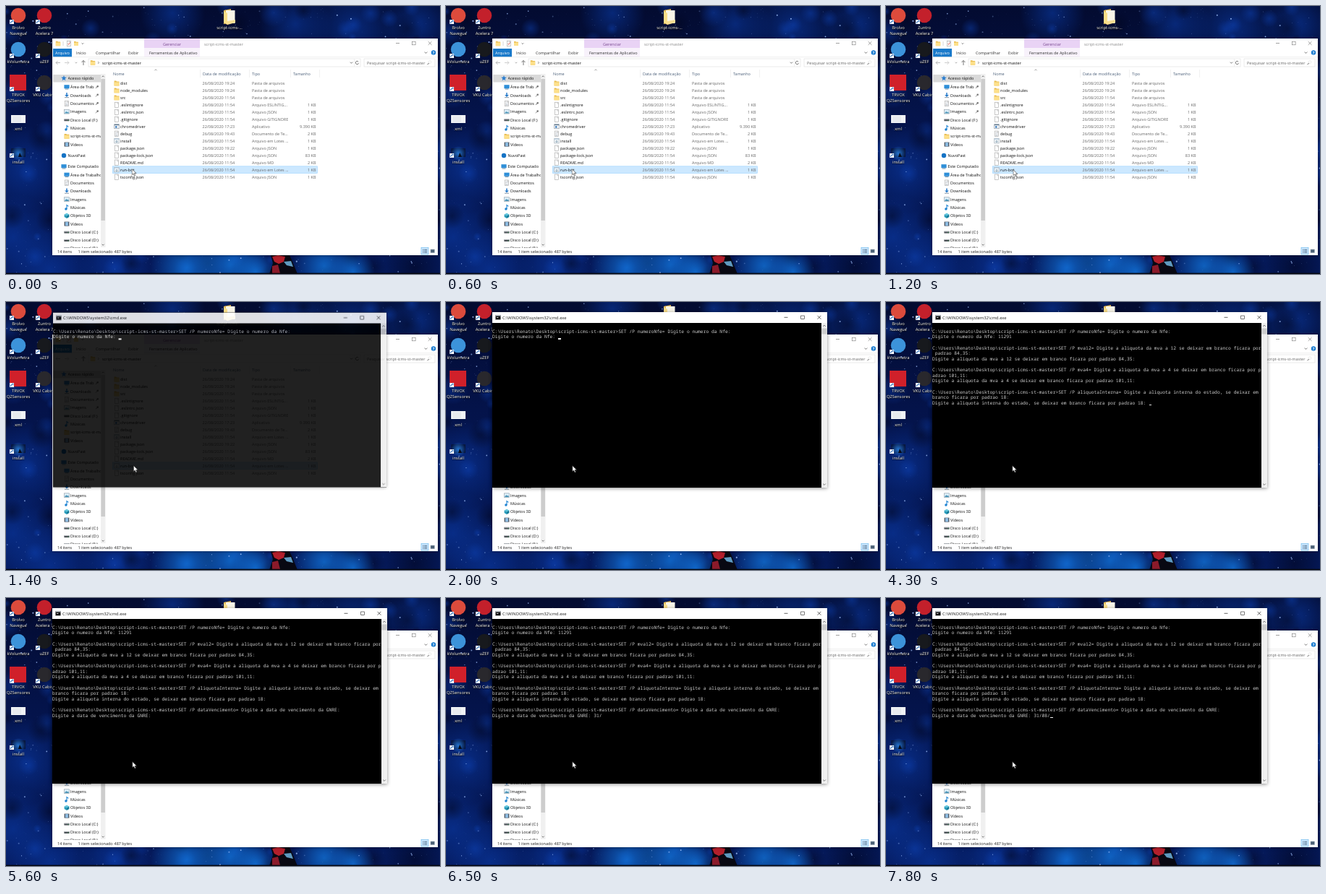
An HTML page with a canvas for the animation above (8 s loop, 600 by 371 pixels).

```html
<!DOCTYPE html>
<html lang="pt-BR">
<head>
<meta charset="utf-8">
<title>Terminal</title>
<style>
html, body { margin: 0; width: 100%; height: 100%; overflow: hidden; background: #020a26; }
#stage { position: absolute; left: 0; top: 0; width: 600px; height: 371px; overflow: hidden;
  font: 5.5px/8px "Open Sans", "Noto Sans", sans-serif; text-rendering: geometricPrecision; }
#stage div, canvas, #mouse { position: absolute; left: 0; top: 0; }
canvas { width: 600px; height: 371px; }
span { position: absolute; white-space: pre; }
.mid { transform: translateX(-50%); }
.end { transform: translateX(-100%); }
.desk { color: #fff; font-size: 5.8px; text-shadow: 0 .5px 1px #000, 0 0 1px #000; }
.dim { color: #666; }
.head { color: #4c607a; }
.side { color: #111; width: 42px; overflow: hidden; }
#cmd { width: 463px; height: 243px; transform: translate(64px, 14px); background: #000;
  box-shadow: 0 1px 5px rgba(0,0,0,.45); visibility: hidden; }
#cmd canvas { width: 463px; height: 243px; }
#out { margin: 0; position: absolute; left: 0; top: 22.6px; color: #ccc;
  font: 6.32px/7.64px "Noto Sans Mono", "DejaVu Sans Mono", monospace; }
#caret { width: 3.8px; height: 1.3px; background: #eee; }
</style>
</head>
<body>
<div id="stage">
  <div id="desk"></div>
  <div id="win"></div>
  <div id="cmd"><pre id="out"></pre><div id="caret"></div></div>
  <svg id="mouse" width="9" height="12" viewBox="0 0 9 12">
    <path d="M.6 .6V8.6L2.5 7 3.8 10 5.2 9.4 4 6.5H6.5Z" fill="#fff" stroke="#222" stroke-width=".6"/>
  </svg>
</div>
<script>
const $ = id => document.getElementById(id);
const COLS = 120, CELL = 3.792, ROW = 7.64, LOOP = 8000;
let g;

function layer(parent, w, h) {
  const c = document.createElement('canvas'), k = Math.max(1, window.devicePixelRatio || 1);
  c.width = w * k; c.height = h * k;
  parent.prepend(c);
  g = c.getContext('2d');
  g.scale(k, k);
}
function rect(x, y, w, h, fill, line) {
  if (fill) { g.fillStyle = fill; g.fillRect(x, y, w, h); }
  if (line) { g.strokeStyle = line; g.lineWidth = .6; g.strokeRect(x, y, w, h); }
}
function disc(x, y, r, fill) {
  g.fillStyle = fill; g.beginPath(); g.arc(x, y, r, 0, 7); g.fill();
}
function path(color, width, ...p) {
  g.strokeStyle = color; g.lineWidth = width; g.beginPath();
  for (let i = 0; i < p.length; i += 2) g.lineTo(p[i], p[i + 1]);
  g.stroke();
}
function shape(color, ...p) {
  g.fillStyle = color; g.beginPath();
  for (let i = 0; i < p.length; i += 2) g.lineTo(p[i], p[i + 1]);
  g.fill();
}
function chevron(x, y, s, dir, color = '#555') {
  path(color, .8, x - s, y - s / 2 * dir, x, y + s / 2 * dir, x + s, y - s / 2 * dir);
}
function controls(x, y, gap, color) {
  path(color, .7, x - 2.5, y, x + 2.5, y);
  rect(x + gap - 2.3, y - 2.3, 4.6, 4.6, null, color);
  const c = x + 2 * gap;
  path(color, .7, c - 2.4, y - 2.4, c + 2.4, y + 2.4);
  path(color, .7, c + 2.4, y - 2.4, c - 2.4, y + 2.4);
}
// y is the vertical centre of the line
function label(parent, x, y, text, cls = '', style = '') {
  const s = document.createElement('span');
  s.className = cls; s.textContent = text;
  s.style.cssText = `left:${x}px;top:${y - 4}px;${style}`;
  parent.append(s);
}
let seed = 11;
const rnd = () => (seed = (seed * 16807) % 2147483647) / 2147483647;

function glow(x, y, r, rgb, a) {
  const f = g.createRadialGradient(x, y, 0, x, y, r);
  f.addColorStop(0, `rgba(${rgb},${a})`);
  f.addColorStop(1, `rgba(${rgb},0)`);
  rect(x - r, y - r, 2 * r, 2 * r, f);
}

function wallpaper() {
  const f = g.createLinearGradient(0, 0, 0, 371);
  f.addColorStop(0, '#030b30'); f.addColorStop(.4, '#04134a'); f.addColorStop(1, '#051a5c');
  rect(0, 0, 600, 371, f);
  const clouds = [[25, 225, 60], [10, 320, 60], [60, 365, 60], [150, 360, 50], [230, 10, 45],
    [400, 25, 50], [480, 30, 70], [570, 25, 50], [600, 190, 60]];
  for (const [x, y, r] of clouds) glow(x, y, r, '10,58,165', .6);
  for (let i = 0; i < 160; i++)
    glow(rnd() * 600, rnd() * 371, 5 + rnd() * 16, rnd() < .5 ? '2,5,28' : '14,66,180', .45);
  for (const [x, y, r] of [[250, 362, 50], [310, 358, 50], [345, 368, 30], [440, 360, 45], [480, 368, 30]])
    glow(x, y, r, '18,120,225', .75);
  glow(565, 362, 45, '2,8,40', .7);
  for (let i = 0; i < 900; i++) {
    g.globalAlpha = .25 + rnd() * .7;
    disc(rnd() * 600, rnd() * 371, .2 + rnd() ** 3 * .9, '#a4c4ff');
  }
  g.globalAlpha = 1;
  shape('#080812', 364, 371, 369, 356, 366, 345, 392, 345, 396, 354, 403, 371);
  shape('#b3202c', 368, 347, 376, 345, 386, 347, 384, 354, 377, 357, 371, 354);
  shape('#8b1a2a', 368, 360, 376, 358, 379, 370, 368, 370);
  shape('#5f9ac0', 384, 354, 394, 353, 397, 361, 388, 359);
  rect(0, 369.6, 600, 1.4, '#05070d');
}

function folder(x, y, s) {
  shape('#e9bd55', x - s, y - s, x - .2 * s, y - s, x, y - .75 * s, x + s, y - .75 * s, x + s, y + s, x - s, y + s);
  shape('#fde08a', x - s, y - .45 * s, x + s, y - .45 * s, x + s, y + s, x - s, y + s);
}

function shortcut(x, y) {
  rect(x, y, 6, 6, '#f4f6fa');
  path('#2368b8', 1, x + 1.3, y + 5, x + 1.8, y + 3, x + 4, y + 2.2);
  shape('#2368b8', x + 3.2, y + .8, x + 5.3, y + .8, x + 5.3, y + 3.2);
}

function desktop() {
  const d = $('desk');
  layer(d, 600, 371);
  wallpaper();
  const apps = [
    [17, 13, '#dc4b3c', 'Brolvo', 'Navegue'], [53, 13, '#c3202b', 'Zuntro', 'Acelera 7'],
    [17, 60, '#3c93da', 'kVolumetra'], [53, 60, '#17191d', 'uZEF'],
    [17, 106, '#d0202a', 'TRVOX', 'QZSensores'], [53, 106, '#29282d', 'VKU Cabine']];
  apps.forEach(([x, y, c, ...names], i) => {
    if (i === 4) rect(5, 95, 23, 22, c); else disc(x, y, 10.3, c);
    shortcut(x - 12, y + 6);
    names.forEach((n, k) => label(d, x, y + 17 + k * 7.5, n, 'desk mid'));
  });
  rect(7, 151, 20, 11, '#f2f4f7');
  for (let y = 153; y < 161; y += 2) rect(9, y, 12, .5, '#c8ccd4');
  label(d, 17, 170, 'xml', 'desk mid');
  rect(7, 197, 20, 12, '#071842');
  glow(17, 204, 10, '40,125,220', .9);
  shape('#080a18', 17, 209, 19, 203, 22, 209);
  shortcut(5, 204);
  label(d, 17, 216, 'install', 'desk mid');
  shape('#e3b650', 301, 6, 311, 4, 311, 23, 301, 25);
  rect(304, 6, 12.5, 18, '#f8f5e8');
  shape('#f9dd88', 301, 7, 306, 10, 306, 26, 301, 23);
  shape('#f6dc92', 306, 21, 317, 19, 317, 23, 306, 26);
  label(d, 309, 30, 'script-icms-...', 'desk mid');
}

const icons = {
  folder: (x, y) => folder(x, y, 3.4),
  file(x, y) {
    rect(x - 2.6, y - 3.7, 5.2, 7.4, '#fff', '#a4a4a4');
    path('#a4a4a4', .5, x + .8, y - 3.7, x + .8, y - 1.8, x + 2.6, y - 1.8);
  },
  doc(x, y) {
    icons.file(x, y);
    for (let k = -1; k < 3; k++) rect(x - 1.6, y + k * 1.3, 3.2, .4, '#8f9aa8');
  },
  bat(x, y) {
    rect(x - 3.2, y - 3.2, 6.4, 6.4, '#f6f9fb', '#8f9eaa');
    rect(x - 3.2, y - 3.2, 6.4, 1.3, '#b9cede');
    disc(x, y + .8, 1.5, '#8ea7b8'); disc(x, y + .8, .6, '#fff');
  },
  app(x, y) {
    rect(x - 3.2, y - 3, 6.4, 6, '#fff', '#6f7f8f');
    rect(x - 3.2, y - 3, 6.4, 1.4, '#6f8496');
    rect(x - 2, y - .6, 2.6, 2.4, '#3f7fc0');
  },
  star(x, y) {
    g.fillStyle = '#2d7fd0'; g.beginPath();
    for (let k = 0; k < 10; k++) {
      const a = k * Math.PI / 5 - Math.PI / 2, r = k % 2 ? 1.7 : 4;
      g.lineTo(x + r * Math.cos(a), y + r * Math.sin(a));
    }
    g.fill();
  },
  desk(x, y) { rect(x - 3.6, y - 2.8, 7.2, 5, '#2f8fd8'); rect(x - 2.4, y + 2.6, 4.8, .8, '#4a6d8c'); },
  down(x, y) {
    path('#2579c9', 1.5, x, y - 3.5, x, y + 1);
    shape('#2579c9', x - 2.8, y - .5, x + 2.8, y - .5, x, y + 2.6);
    rect(x - 3, y + 2.8, 6, .8, '#6d8295');
  },
  image(x, y) {
    rect(x - 3.6, y - 2.8, 7.2, 5.6, '#dff0fb', '#8a98a4');
    shape('#4a95b7', x - 3, y + 2.3, x - .8, y - .5, x + .8, y + 1, x + 1.8, y, x + 3, y + 2.3);
  },
  disk(x, y) { rect(x - 3.6, y - 1.2, 7.2, 2.8, '#4c5258'); rect(x - 3.6, y - 1.2, 7.2, .8, '#b9bec3'); disc(x + 2.2, y + .6, .6, '#3aa655'); },
  music(x, y) { path('#1e83d2', 1.1, x, y + 2, x, y - 3.4, x + 2.4, y - 1.6); disc(x - 1.1, y + 2, 1.7, '#1e83d2'); },
  cube(x, y) {
    shape('#5cc4dc', x, y - 3.6, x + 3.4, y - 1.8, x, y, x - 3.4, y - 1.8);
    shape('#2a9dbb', x - 3.4, y - 1.8, x, y, x, y + 3.6, x - 3.4, y + 1.8);
    shape('#187f9c', x + 3.4, y - 1.8, x, y, x, y + 3.6, x + 3.4, y + 1.8);
  },
  video(x, y) { rect(x - 3.4, y - 3, 6.8, 6, '#4d5866'); rect(x - 2, y - 2.5, 4, 5, '#8cbbe0'); },
  cloud: (x, y) => disc(x, y, 3.2, '#1673c5')
};

const sidebar = [
  [100, 'star', 'Acesso rápido', 1], [112, 'desk', 'Área de Trabalho'], [123.5, 'down', 'Downloads'],
  [135, 'doc', 'Documentos'], [146.3, 'image', 'Imagens'], [157.7, 'disk', 'Disco Local (F:)'],
  [169, 'music', 'Músicas'], [180.4, 'folder', 'script-icms-st-master'], [191.6, 'video', 'Vídeos'],
  [207, 'cloud', 'NuvoPast', 1], [222, 'desk', 'Este Computador', 1], [233.5, 'desk', 'Área de Trabalho'],
  [244.7, 'doc', 'Documentos'], [256, 'down', 'Downloads'], [267.6, 'image', 'Imagens'],
  [279, 'music', 'Músicas'], [290.3, 'cube', 'Objetos 3D'], [301.6, 'video', 'Vídeos'],
  [313, 'disk', 'Disco Local (C:)'], [324.4, 'disk', 'Disco Local (D:)'], [335.2, 'disk', 'Disco Local (E:)']];

const DIR = 'Pasta de arquivos', BAT = 'Arquivo em Lotes ...', JSN = 'Arquivo JSON';
const files = [
  ['folder', 'dist', '26/08/2020 19:24', DIR], ['folder', 'node_modules', '26/08/2020 19:24', DIR],
  ['folder', 'src', '26/08/2020 11:54', DIR],
  ['file', '.eslintignore', '26/08/2020 11:54', 'Arquivo ESLINTIG...', '1 KB'],
  ['file', '.eslintrc.json', '26/08/2020 11:54', JSN, '1 KB'],
  ['file', '.gitignore', '26/08/2020 11:54', 'Arquivo GITIGNORE', '1 KB'],
  ['app', 'chromedriver', '22/08/2020 17:23', 'Aplicativo', '9.390 KB'],
  ['doc', 'debug', '26/08/2020 19:43', 'Documento de Te...', '2 KB'],
  ['bat', 'install', '26/08/2020 11:54', BAT, '1 KB'],
  ['file', 'package.json', '26/08/2020 19:22', JSN, '1 KB'],
  ['file', 'package-lock.json', '26/08/2020 11:54', JSN, '83 KB'],
  ['file', 'README.md', '26/08/2020 11:54', 'Arquivo MD', '2 KB'],
  ['bat', 'run-bot', '26/08/2020 11:54', BAT, '1 KB'],
  ['file', 'tsconfig.json', '26/08/2020 11:54', JSN, '1 KB']];

function explorer() {
  const w = $('win'), title = 'script-icms-st-master';
  layer(w, 600, 371);
  g.shadowColor = 'rgba(0,0,0,.5)'; g.shadowBlur = 4;
  rect(64, 45, 533, 300, '#fff');
  g.shadowBlur = 0;

  // title bar and ribbon tabs
  folder(72, 52, 3.2);
  path('#aaa', .5, 79, 49, 79, 55);
  icons.file(87, 52); path('#d03c3c', .8, 85.6, 52, 86.7, 53.4, 88.6, 50.5);
  folder(97, 52, 3);
  chevron(106, 52, 1.3, 1);
  rect(191, 45, 77, 13, '#e9d3f5');
  rect(191, 58, 77, 12.5, '#f8f2fb');
  label(w, 229.5, 52.5, 'Gerenciar', 'mid', 'color:#7a4a91');
  label(w, 274, 52.5, title, '', 'color:#8a8a8a');
  controls(541.5, 51.5, 22.3, '#777');
  rect(65, 59, 26, 11.5, '#1979ca');
  label(w, 78, 64.7, 'Arquivo', 'mid', 'color:#fff');
  [[97, 'Início'], [124, 'Compartilhar'], [169, 'Exibir'], [198, 'Ferramentas de Aplicativo']]
    .forEach(([x, s]) => label(w, x, 64.7, s, '', 'color:#333'));
  chevron(580.5, 64.5, 1.8, 1);
  disc(591, 64.5, 3.2, '#1c7cd0');
  label(w, 591, 64.5, '?', 'mid', 'color:#fff;font-weight:700');
  rect(64, 70.5, 533, .6, '#e4e4e4');

  // address row
  path('#aaa', .8, 75, 78.5, 69, 78.5); path('#aaa', .8, 71.5, 76, 69, 78.5, 71.5, 81);
  path('#c4c4c4', .8, 81, 78.5, 87, 78.5); path('#c4c4c4', .8, 84.5, 76, 87, 78.5, 84.5, 81);
  chevron(97, 78.5, 1.3, 1, '#999');
  path('#555', .8, 107, 82, 107, 75.5); path('#555', .8, 104.5, 78, 107, 75.5, 109.5, 78);
  rect(114, 73, 376, 11, '#fff', '#dedede');
  folder(120, 78.5, 3.2);
  path('#555', .6, 127, 77, 128.5, 78.5, 127, 80);
  label(w, 133, 78.5, title, '', 'color:#111');
  chevron(477.5, 78.5, 1.6, 1);
  rect(481.5, 73, .5, 11, '#dedede');
  g.strokeStyle = '#555'; g.lineWidth = .8; g.beginPath(); g.arc(485.5, 78.5, 2.2, .3, 5.6); g.stroke();
  rect(495, 73, 98, 11, '#fff', '#dedede');
  label(w, 499, 78.5, 'Pesquisar ' + title, 'dim');
  g.beginPath(); g.arc(586, 77.6, 1.9, 0, 7); g.stroke();
  path('#555', .9, 584.6, 79, 582.6, 81.2);

  // navigation pane
  rect(65, 95, 66, 10.5, '#d9d9d9');
  g.save(); g.beginPath(); g.rect(64, 88, 75, 247); g.clip();
  const pane = document.createElement('div');
  pane.style.cssText = 'width:137px;height:335px;overflow:hidden';
  w.append(pane);
  sidebar.forEach(([y, kind, s, root], i) => {
    const x = root ? 80 : 84;
    icons[kind](x, y);
    const pin = i > 0 && i < 5;
    label(pane, root ? 85.5 : 89, y, s, 'side', pin ? 'width:33px' : '');
    if (pin) { path('#777', .9, 124, y + 2, 126, y); disc(126.7, y - .7, 1.3, '#777'); }
  });
  g.restore();
  rect(131, 94, 6.5, 240, '#f0f0f0');
  rect(131.4, 101, 5.6, 196, '#cdcdcd');
  chevron(134.2, 97.5, 1.5, -1);
  chevron(134.2, 330.5, 1.5, 1);

  // file list
  [[148, 'Nome'], [272, 'Data de modificação'], [340, 'Tipo'], [397, 'Tamanho']]
    .forEach(([x, s]) => label(w, x, 93.5, s, 'head'));
  chevron(207, 88.5, 1.6, -1, '#888');
  [268, 336, 393, 433].forEach(x => rect(x, 88, .5, 11, '#e2e2e2'));
  files.forEach(([kind, name, date, type, size], i) => {
    const y = 107 + i * 9.97;
    if (i === 12) rect(147.3, y - 4.8, 283, 9.6, '#cce8ff', '#99d1ff');
    icons[kind](153, y);
    label(w, 158, y, name, '', 'color:#111');
    label(w, 271.5, y, date, 'dim');
    label(w, 340, y, type, 'dim');
    if (size) label(w, 428.5, y, size, 'dim end');
  });

  // status bar
  label(w, 71, 339.5, '14 itens', '', 'color:#222');
  label(w, 99.5, 339.5, '1 item selecionado', '', 'color:#222');
  label(w, 149.5, 339.5, '487 bytes', '', 'color:#222');
  rect(574, 334.5, 10, 9.5, '#cce8ff', '#5fb2ea');
  for (let k = 0; k < 3; k++) {
    rect(576, 336.8 + k * 2, 1.4, 1, '#4f6f8c');
    rect(578.2, 336.8 + k * 2, 4, 1, '#4f6f8c');
  }
  rect(587, 337, 5.4, 4.6, '#4b6076', '#9aa8b5');
}

function terminal() {
  const c = $('cmd');
  layer(c, 463, 243);
  rect(0, 0, 463, 15, '#fff');
  rect(4.5, 4.2, 7, 6, '#0a0a0a', '#8b8b8b');
  rect(4.5, 4.2, 7, 1.3, '#c9d2da');
  rect(6, 7, 2.5, .8, '#fff');
  label(c, 14, 7.5, 'C:\\WINDOWS\\system32\\cmd.exe', '', 'color:#222;font-size:5.8px');
  controls(406, 7.3, 23, '#222');
  rect(455, 15, 8, 228, '#f0f0f0');
  rect(455.4, 22.5, 7.2, 8, '#cdcdcd');
  chevron(459, 19, 1.8, -1);
  chevron(459, 238.5, 1.8, 1);
}

// [time, text added to the console]
const log = [];
function ask(time, name, text) {
  const start = log.length ? '\n\n' : '';
  log.push([time, `${start}C:\\Users\\Renato\\Desktop\\script-icms-st-master>SET /P ${name}= ${text}: \n${text}: `]);
}
const type = (time, step, text) => [...text].forEach((ch, i) => log.push([time + i * step, ch]));
const rate = s => `Digite a aliquota ${s} se deixar em branco ficara por padrao `;

ask(1300, 'numeroNfe', 'Digite o numero da Nfe');
type(2300, 150, '11291');
ask(3200, 'mva12', rate('da mva a 12') + '84,35');
ask(3800, 'mva4', rate('da mva a 4') + '101,11');
ask(4300, 'aliquotaInterna', rate('interna do estado,') + '18');
ask(4900, 'dataVencimento', 'Digite a data de vencimento da GNRE');
type(5900, 140, '31/');
type(7200, 100, '08');
type(7600, 100, '/');

function wrap(text) {
  return text.split('\n').flatMap(s => {
    const rows = [];
    do { rows.push(s.slice(0, COLS)); s = s.slice(COLS); } while (s.trim());
    return rows;
  });
}

const trail = [[0, 173.5, 225], [600, 173.5, 225], [1200, 175.3, 226], [1400, 175.8, 226], [1900, 174.2, 226], [LOOP, 174.2, 226]];
function pointer(t) {
  const i = Math.max(1, trail.findIndex(p => p[0] > t));
  const [a, x, y] = trail[i - 1], [b, u, v] = trail[i], k = (t - a) / (b - a);
  return [x + (u - x) * k, y + (v - y) * k];
}

let shown = -1;
function draw(now) {
  const t = now % LOOP;
  const p = Math.min(1, Math.max(0, (t - 1280) / 200)), cmd = $('cmd');
  cmd.style.visibility = p > 0 ? 'visible' : 'hidden';
  cmd.style.opacity = 1 - (1 - p) ** 2.2;
  cmd.style.transform = `translate(64px, 14px) scale(${.986 + .014 * p ** .7})`;

  const done = log.filter(e => e[0] <= t);
  if (done.length !== shown) {
    shown = done.length;
    const rows = wrap(done.map(e => e[1]).join(''));
    $('out').textContent = rows.join('\n');
    $('caret').style.left = rows[rows.length - 1].length * CELL + 'px';
    $('caret').style.top = 22.6 + rows.length * ROW - 1.5 + 'px';
  }
  const fresh = shown && t - done[shown - 1][0] < 300;
  $('caret').style.opacity = fresh || Math.floor(t / 400) % 2 ? 1 : 0;

  const [x, y] = pointer(t);
  $('mouse').style.transform = `translate(${x}px, ${y}px)`;
  requestAnimationFrame(tick);
}
let origin;
function tick(now) {
  if (origin === undefined) origin = now;
  draw(now - origin);
}

desktop();
explorer();
terminal();
draw(0);
</script>
</body>
</html>
```
